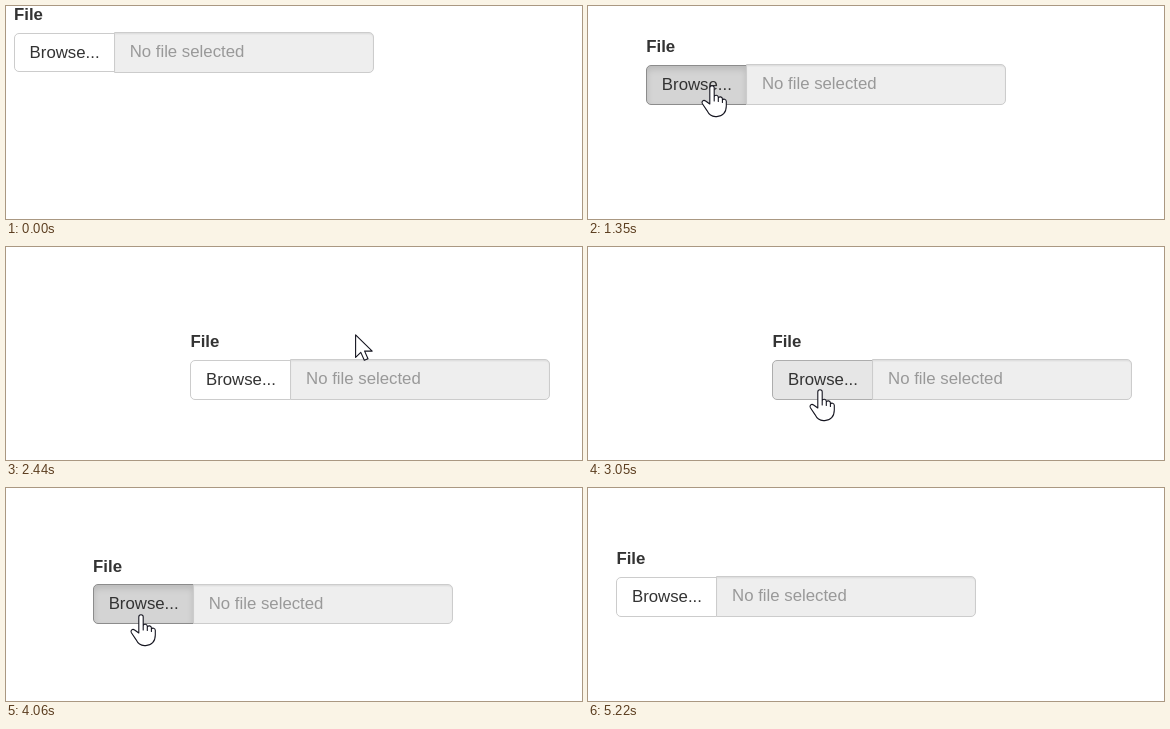
An HTML page for the animation above (6000 ms loop, 576 px wide and 213 px high).

```html
<!DOCTYPE html>
<html lang="en">
<head>
<meta charset="utf-8">
<title>Draggable file input</title>
<style>
  html, body { margin: 0; width: 100%; height: 100%; overflow: hidden; background: #fff; }
  #widget {
    position: absolute;
    font: 16.8px/19px "Liberation Sans", Arial, sans-serif; color: #333; white-space: nowrap;
  }
  #widget > * { position: absolute; box-sizing: border-box; }
  #label { left: 0; top: -27px; font-weight: bold; }
  #button, #field { border: 1px solid #ccc; }
  #button {
    left: 0; top: .6px; width: 100.85px; height: 39.6px; padding: 9.4px 14.6px;
    border-radius: 5px 0 0 5px; background: #fff;
  }
  #button.hover { background: #e6e6e6; border-color: #adadad; }
  #button.active {
    background: #d4d4d4; border-color: #8c8c8c;
    box-shadow: inset 0 3.6px 6px rgba(0, 0, 0, .125);
  }
  #field {
    left: 99.65px; top: 0; width: 260.35px; height: 40.8px; padding: 9px 15px;
    border-radius: 0 5px 5px 0; background: #eee; color: #999;
    box-shadow: inset 0 1.2px 1.2px rgba(0, 0, 0, .075);
  }
  svg { position: absolute; left: 0; top: 0; width: 100%; height: 100%; }
  path { fill: #fff; stroke: #14141f; stroke-width: 1.1; stroke-linejoin: round; stroke-linecap: round; }
</style>
</head>
<body>
<div id="widget">
  <div id="label">File</div>
  <div id="button">Browse...</div>
  <div id="field">No file selected</div>
</div>
<svg>
  <path id="arrow" d="M.6 .8V23.4L5.8 18.4 9.3 26.3 13 24.7 9.6 17.1H17.2Z"/>
  <path id="hand" d="M-2.2 19V3A2.2 2.2 0 0 1 2.2 3V16V11.5C2.8 9.6 6 9.9 6.3 12V16.5V13
    C7 11.2 10.2 11.6 10.4 13.8V17.5V15C11.2 13.4 14.2 14 14.3 16.2V21
    C14.3 27.5 10.5 31.6 4.8 31.6H3.4C-1.6 31.6 -3.6 28.6 -5 25.6
    L-9.6 18.8C-11 16.2 -8.4 14.6 -6.4 16Z"/>
</svg>
<script>
const LOOP = 6000, STEP = 77, PHASE = 43;
const $ = id => document.getElementById(id);
const widget = $('widget'), button = $('button'), arrow = $('arrow'), hand = $('hand');

// Pointer stops: x, y, arrival and, where it rests, departure
const stops = [
  [362, 200, 70], [74, 47, 660, 890], [83.6, 59, 967], [148, 89, 1430], [212, 113, 1737],
  [250.4, 133.4, 2050, 2125], [349, 87, 2430], [322, 61, 2590], [270, 105, 2740],
  [231.9, 142.4, 3050, 3525], [192.5, 130.4, 3739], [81.9, 121, 4432],
  [75.9, 118.4, 4600, 4890], [369, 200, 5150]
].map(([x, y, arrive, leave = arrive]) => ({ x, y, arrive, leave }));

// Drags: the widget follows the pointer at a fixed offset
const drags = [
  { from: 885, to: 2125, dx: 66, dy: 21 },
  { from: 3440, to: 4890, dx: 47.5, dy: 30 }
];

const rate = (i, axis) =>
  (stops[i + 1][axis] - stops[i][axis]) / (stops[i + 1].arrive - stops[i].leave);

function slope(i, axis) {
  if (stops[i].leave > stops[i].arrive) return 0;
  if (i === 0) return rate(0, axis);
  if (i === stops.length - 1) return rate(i - 1, axis);
  const a = rate(i - 1, axis), b = rate(i, axis);
  return a * b > 0 ? 2 * a * b / (a + b) : 0;
}

// Smooth path through the stops without overshoot
function pointer(t, axis) {
  const next = stops.findIndex(s => s.arrive > t);
  if (next === 0) return stops[0][axis];
  if (next < 0) return stops[stops.length - 1][axis];
  const i = next - 1, a = stops[i], b = stops[next];
  const span = b.arrive - a.leave;
  const u = Math.max(0, (t - a.leave) / span), v = 1 - u;
  return a[axis] * (1 + 2 * u) * v * v + b[axis] * (3 - 2 * u) * u * u
    + span * u * v * (slope(i, axis) * v - slope(next, axis) * u);
}

function draw(time) {
  const t = Math.floor((time - PHASE) / STEP) * STEP + PHASE;
  const cx = Math.round(pointer(t, 'x')), cy = Math.round(pointer(t, 'y'));
  const shown = t > 60 && t < 5200;

  const drag = t < drags[1].from ? drags[0] : drags[1];
  const held = Math.min(Math.max(t, drag.from), drag.to);
  const x = pointer(held, 'x') - drag.dx, y = pointer(held, 'y') - drag.dy;
  const pressed = held === t;
  const over = shown && cx >= x && cx < x + 100 && cy > y && cy < y + 41;

  widget.style.left = x + 'px';
  widget.style.top = y + 'px';
  button.className = pressed ? 'active' : over ? 'hover' : '';

  for (const shape of [arrow, hand]) {
    const current = pressed || over ? hand : arrow;
    shape.setAttribute('transform', `translate(${cx} ${cy})`);
    shape.style.display = shown && shape === current ? '' : 'none';
  }
}

const start = performance.now();
function loop() {
  draw((performance.now() - start) % LOOP);
  requestAnimationFrame(loop);
}
loop();
</script>
</body>
</html>
```
